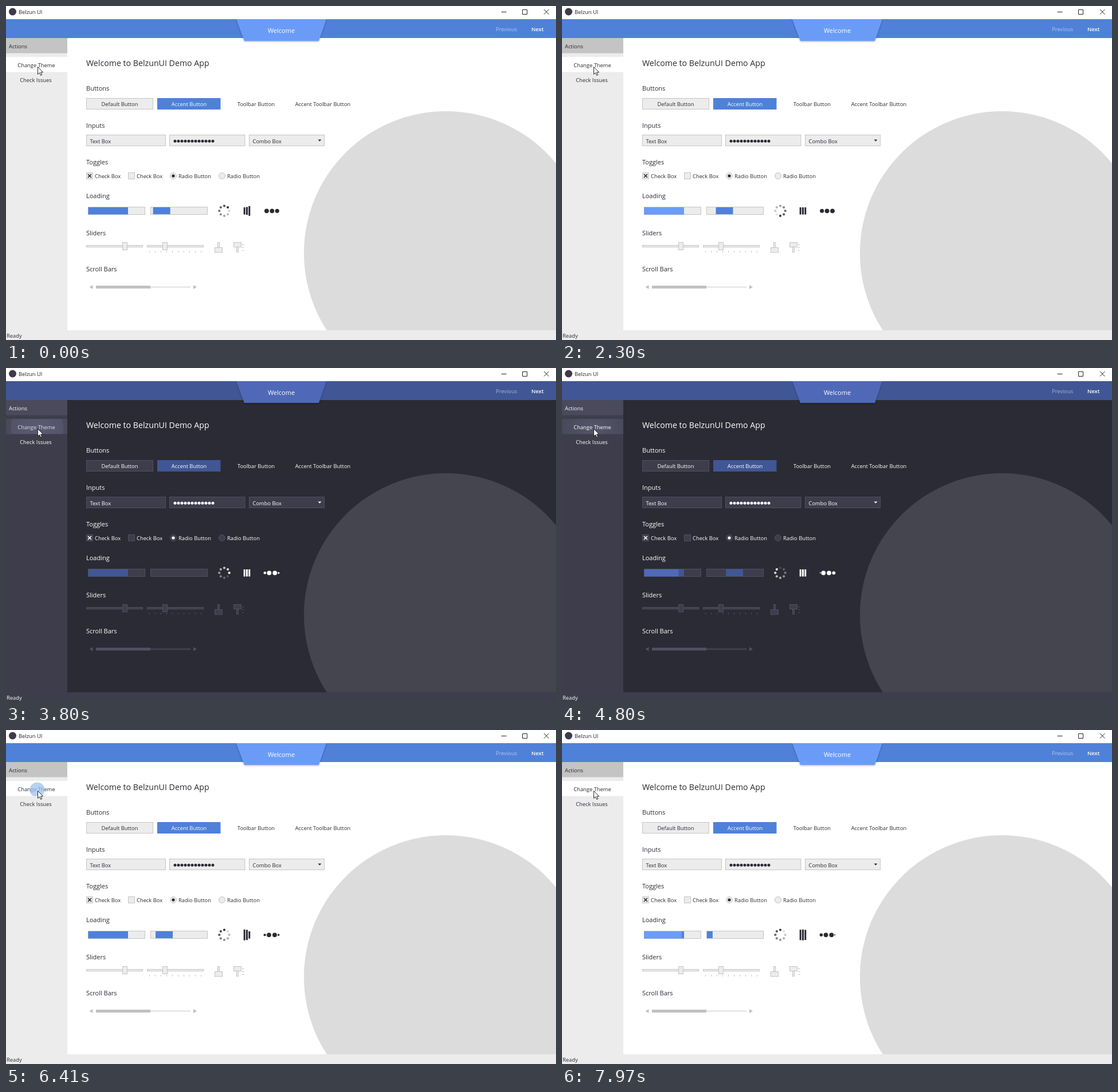
Recreate the animation shown at these times as an HTML page. Size 960 px wide and 584 px high, loop 8 s.

```html
<!DOCTYPE html>
<html lang="en">
<head>
<meta charset="utf-8">
<title>Theme demo</title>
<style>
html, body { margin: 0; width: 100%; height: 100%; overflow: hidden; background: #fff; }
svg { display: block; width: 960px; height: 584px; font: 9.35px "Open Sans", "Noto Sans", sans-serif; }
.light {
  --accent: #4f81d9; --tab: #6b9cf7; --page: #fff; --side: #ececec; --head: #c4c4c4;
  --hover: #fff; --glow: #fff; --ctl: #ececec; --line: #c5c5c5; --thumb: #c1c1c1; --thin: #e8e8e8;
  --text: #2b2a33; --mark: #dcdcdc; --shine: #6b9cf7; --ripple: #9cc3ee; --rippleMax: .75;
}
.dark {
  --accent: #415695; --tab: #5069b8; --page: #2a2b34; --side: #3d3d4c; --head: #4a4a5c;
  --hover: #49495b; --glow: #55556b; --ctl: #3d3d4c; --line: #4f4f61; --thumb: #505061; --thin: #3f3f4e;
  --text: #fff; --mark: #44454e; --shine: #5069b8; --ripple: #6e6e8c; --rippleMax: .35;
}
text { fill: var(--text); }
.mid { text-anchor: middle; }
.h { font-size: 11px; }
.w { fill: #fff; }
.b { fill: var(--ctl); stroke: var(--line); }
.a { fill: var(--accent); }
.t { fill: var(--text); }
</style>
</head>
<body>
<svg id="stage" class="light" viewBox="0 0 960 584">
  <defs>
    <clipPath id="page"><rect x="107" y="56" width="853" height="511"/></clipPath>
    <clipPath id="item"><rect y="89" width="107" height="26.5"/></clipPath>
    <clipPath id="bar"><rect x="253" y="352" width="98" height="12"/></clipPath>
    <radialGradient id="spot" gradientUnits="userSpaceOnUse" cx="56" cy="106" r="56">
      <stop offset="0" style="stop-color:var(--glow)"/>
      <stop offset="1" style="stop-color:var(--hover)"/>
    </radialGradient>
    <filter id="shade" x="-10%" y="-10%" width="120%" height="140%">
      <feDropShadow dx="0" dy="1" stdDeviation="1.8" flood-color="#000" flood-opacity=".35"/>
    </filter>
    <clipPath id="under"><rect x="390" y="23" width="180" height="50"/></clipPath>
  </defs>
  <rect width="960" height="584" fill="#fff"/>
  <rect y="56" width="960" height="528" style="fill:var(--side)"/>
  <g clip-path="url(#page)">
    <rect x="107" y="56" width="853" height="511" style="fill:var(--page)"/>
    <circle cx="768" cy="432" r="248" style="fill:var(--mark)"/>
  </g>
  <circle cx="11.5" cy="10" r="6.5" fill="#40394a"/>
  <text x="22" y="13.8" style="fill:#222">Belzun UI</text>
  <path d="M864.500 10.500h9M901.500 6.500h8v8h-8zM939 6l8.500 8.500m0-8.500l-8.500 8.500" fill="none" stroke="#222"/>
  <rect class="a" y="23" width="960" height="33"/>
  <g clip-path="url(#under)">
    <path d="M402 23H559L546 61H416Z" filter="url(#shade)" style="fill:var(--tab)"/>
  </g>
  <text class="mid w" x="480.500" y="47" style="font-size:11px;fill:#fff">Welcome</text>
  <text x="855" y="44" style="fill:#fff" opacity=".55">Previous</text>
  <text x="917" y="44" style="fill:#fff" font-weight="600">Next</text>
  <rect y="56" width="107" height="26.5" style="fill:var(--head)"/>
  <text x="5" y="73.500">Actions</text>
  <rect y="89" width="107" height="26.500" fill="url(#spot)"/>
  <text class="mid" x="53" y="106.500">Change Theme</text>
  <text class="mid" x="52" y="133">Check Issues</text>
  <g clip-path="url(#item)"><circle id="ripple" cx="54.500" cy="104.500" style="fill:var(--ripple)"/></g>
  <text x="1" y="580">Ready</text>
  <g id="form"></g>
  <g id="live"></g>
  <path d="M55.500 106.500v13l3-2.800 2.200 4.600 2-.9-2.100-4.500h4.100z" fill="#fff" stroke="#111" stroke-width=".9"/>
</svg>
<script>
const NS = 'http://www.w3.org/2000/svg';
const $ = id => document.getElementById(id);
const stage = $('stage'), form = $('form'), live = $('live'), ripple = $('ripple');

function set(el, attrs) {
  for (const k in attrs) el.setAttribute(k, attrs[k]);
  return el;
}
function add(parent, tag, attrs, label) {
  const el = set(document.createElementNS(NS, tag), attrs);
  if (label) el.textContent = label;
  return parent.appendChild(el);
}
const box = (x, y, width, height, cls = 'b', parent = form) =>
  add(parent, 'rect', { x, y, width, height, class: cls });
const label = (x, y, s, cls = '') => add(form, 'text', { x, y, class: cls }, s);
const dot = (cx, cy, r, cls = 't', parent = form) =>
  add(parent, 'circle', { cx, cy, r, class: cls });
const path = (d, style) => add(form, 'path', { d, style });

// Static form
add(form, 'text', { x: 140, y: 105, 'font-size': 14.2 }, 'Welcome to BelzunUI Demo App');
[['Buttons', 148], ['Inputs', 213], ['Toggles', 277], ['Loading', 336], ['Sliders', 401], ['Scroll Bars', 464]]
  .forEach(([s, y]) => label(140, y, s, 'h'));

box(140.5, 161.5, 116, 19);
label(198.5, 175, 'Default Button', 'mid');
box(264, 161, 110.5, 20, 'a');
label(319.5, 175, 'Accent Button', 'mid').style.cssText = 'fill:#fff;font-weight:500';
label(436.5, 175, 'Toolbar Button', 'mid');
label(553, 175, 'Accent Toolbar Button', 'mid');

box(140.5, 225.5, 138, 19);
box(285.5, 225.5, 131.5, 19);
box(424.5, 225.5, 131, 19);
label(146.5, 239.5, 'Text Box');
label(430.5, 239.5, 'Combo Box');
for (let i = 0; i < 12; i++) dot(295 + i * 6, 236.2, 2.5);
path('M544.500 233.500h6l-3 3.200z', 'fill:var(--text)');

box(140.5, 291.5, 11, 11);
path('M143 294l6 6m0-6l-6 6', 'stroke:var(--text);stroke-width:1.7');
box(213.5, 291.5, 11, 11);
dot(292, 297, 5.5, 'b');
dot(292, 297, 2.6);
dot(377, 297, 5.5, 'b');
[[155, 'Check Box'], [228, 'Check Box'], [301, 'Radio Button'], [386, 'Radio Button']]
  .forEach(([x, s]) => label(x, 301, s));

for (const [x, thumb] of [[140.5, 203.5], [246.5, 273.5]]) {
  box(x, 418.5, 98, 3);
  box(thumb, 413.5, 8, 13);
}
let ticks = '';
for (let i = 0; i < 10; i++) ticks += `M${250.5 + i * 10} 428v3`;
for (let i = 0; i < 3; i++) ticks += `M412 ${417.5 + i * 5}h3.500`;
path(ticks, 'stroke:var(--line)');
box(369.5, 413.5, 3, 17);
box(364.5, 422.5, 13, 8.5);
box(402.5, 413.5, 3, 17);
box(397.5, 413.5, 13, 8);

path('M157 491.500h165', 'stroke:var(--thin);stroke-width:3');
path('M157 491.500h95', 'stroke:var(--thumb);stroke-width:5');
path('M151.500 488v7l-6-3.500zM327 488v7l6-3.500z', 'fill:var(--thumb)');

// Moving parts
box(143.5, 351.5, 99, 13, 'b', live);
box(143.5, 352, 69.5, 12.5, 'a', live);
const shine = box(143.5, 352, 0, 12.5, '', live);
shine.style.fill = 'var(--shine)';
box(252.5, 351.5, 99, 13, 'b', live);
const runner = box(223, 352, 30, 12, 'a', live);
runner.setAttribute('clip-path', 'url(#bar)');
const spin = Array.from({ length: 8 }, (_, i) => {
  const a = i * Math.PI / 4;
  return dot(381 + 8.7 * Math.sin(a), 358.2 - 8.7 * Math.cos(a), 2.1, 't', live);
});
const bars = [414.7, 419, 423.3].map(x => box(x, 350, 3, 13, 't', live));
const dots = Array.from({ length: 4 }, () => dot(463.5, 358.3, 4, 't', live));

const LOOP = 8000, TO_DARK = 3300, TO_LIGHT = 6350;
const frac = v => v - Math.floor(v);
const clamp = v => Math.max(0, Math.min(1, v));

function pulse(x) {
  const half = x < 0 ? .2 : .33;
  return Math.abs(x) < half ? Math.cos(Math.PI / 2 * x / half) : 0;
}

function draw(t) {
  const first = t < TO_DARK;
  stage.setAttribute('class', t >= TO_DARK && t < TO_LIGHT ? 'dark' : 'light');

  // The loaders lag a little before the first click, then restart
  const u = t - 265 * clamp((t - 1690) / 1410);
  const v = t - 5830;

  const age = t - (t < 3816 ? 458 : t < 6780 ? 3816 : 6780);
  const on = age > 0 && age < 2010;
  const left = 1 - clamp(age / 1560);
  set(shine, { width: on ? 69.5 * (1 - left * left) : 0, opacity: on ? clamp(age / 300) : 0 });

  const run = first ? frac((u + 525) / 2000) : t < 3816 ? 0 : frac((t - 3816) / 2000);
  runner.setAttribute('x', 223 + 128 * run);

  const head = first ? u / 1500 + 1 / 6 : v / 1500 + 2 / 3;
  spin.forEach((el, i) => el.setAttribute('opacity', 1 - .88 * frac(head - i / 8)));

  const beat = frac(first ? .51 + (u - 1490) / 500 : v / 500);
  bars.forEach((el, i) => {
    const h = 12.5 + 6.5 * pulse(beat - [.18, .24, .36][i]);
    set(el, { y: 358.3 - h / 2, height: h });
  });

  const step = first ? (u + 30) / 1500 : v / 1500;
  dots.forEach((el, i) => {
    const q = frac(step + i / 4);
    set(el, {
      cx: 463.5 + 13 * Math.sin((q - .5) * Math.PI),
      r: 3.9 * clamp(4 * Math.min(q, 1 - q))
    });
  });

  const since = t - (t < 6200 ? 3060 : 6200);
  const shown = since > 0 && since < 1000;
  set(ripple, {
    r: shown ? .062 * since : 0,
    opacity: clamp((1000 - since) / 400)
  });
  ripple.style.fillOpacity = 'var(--rippleMax)';
}

const start = performance.now();
function tick() {
  draw((performance.now() - start) % LOOP);
  requestAnimationFrame(tick);
}
tick();
</script>
</body>
</html>
```
